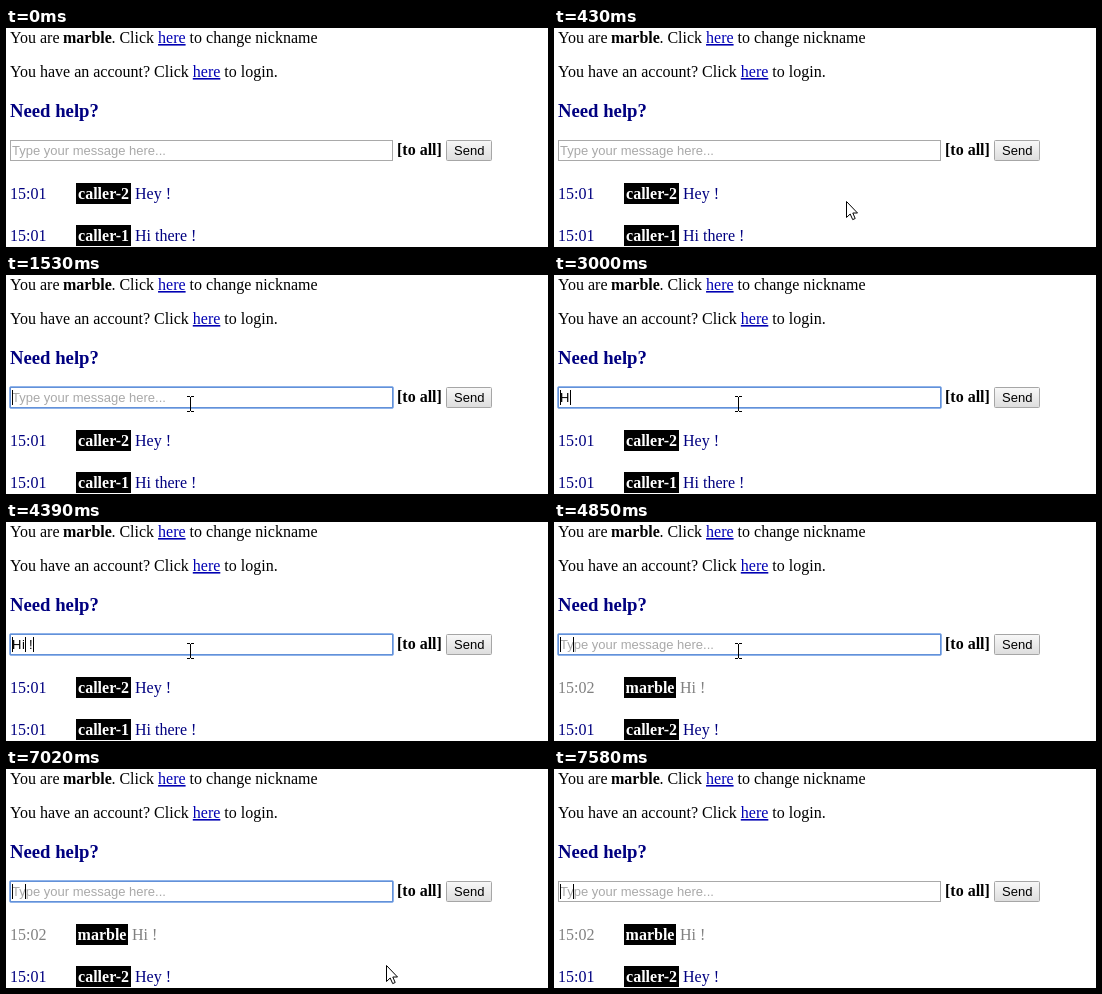
These frames come from a looping animation (542 px wide and 219 px high, 7650 ms). An HTML page:

```html
<!DOCTYPE html>
<html lang="en">
<head>
<meta charset="utf-8">
<title>Chat box</title>
<style>
html, body { margin: 0; width: 100%; height: 100%; overflow: hidden; background: #fff; }
svg { display: block; }
text { font: 16px "Liberation Serif", "Times New Roman", serif; }
.bold { font-weight: bold; }
.title { font-size: 18.72px; font-weight: bold; fill: #000080; }
.link { fill: #0000b3; text-decoration: underline; }
.ui { font: 13px "Liberation Sans", Arial, sans-serif; }
.hint { fill: #a9a9a9; }
.navy { fill: #000080; }
.gray { fill: #808080; }
.tag { font-weight: bold; fill: #fff; text-anchor: middle; }
.crisp { shape-rendering: crispEdges; }

/* every change is a hard cut on one 7650 ms clock */
.anim { opacity: 0; animation: 7650ms step-end infinite; }
.focus { animation-name: focus; }
.hint { animation-name: hint; }
.key-h { animation-name: typed-h; }
.key-i { animation-name: typed-i; }
.key-mark { animation-name: typed-mark; }
.caret-start { animation-name: caret-start; }
.caret-h { animation-name: caret-h; }
.caret-i { animation-name: caret-i; }
.before { animation-name: before; }
.after { animation-name: after; }
.beam { animation-name: beam; }
.arrow { animation-name: arrow; }

@keyframes focus { 0%, 97.77%, 100% { opacity: 0 } 12.81% { opacity: 1 } }
@keyframes hint { 0%, 63.39%, 100% { opacity: 1 } 39.21% { opacity: 0 } }
@keyframes typed-h { 0%, 63.39%, 100% { opacity: 0 } 39.21% { opacity: 1 } }
@keyframes typed-i { 0%, 63.39%, 100% { opacity: 0 } 42.22% { opacity: 1 } }
@keyframes typed-mark { 0%, 63.39%, 100% { opacity: 0 } 57.38% { opacity: 1 } }
@keyframes caret-start { 0% { opacity: 0 } 12.81%, 100% { opacity: 1 } }
@keyframes caret-h { 0%, 42.22%, 100% { opacity: 0 } 39.21% { opacity: 1 } }
@keyframes caret-i { 0% { opacity: 0 } 42.22%, 100% { opacity: 1 } }
@keyframes before { 0% { opacity: 1 } 63.39%, 100% { opacity: 0 } }
@keyframes after { 0% { opacity: 0 } 63.39%, 100% { opacity: 1 } }
@keyframes beam { 0%, 86.79%, 100% { opacity: 0 } 8.62% { opacity: 1 } }
@keyframes arrow {
  0% { opacity: 0; transform: translate(363px, 195px) }
  4.7% { opacity: 1; transform: translate(363px, 195px) }
  5.62% { opacity: 1; transform: translate(292px, 173px) }
  6.66% { opacity: 1; transform: translate(234px, 153px) }
  7.58% { opacity: 1; transform: translate(200px, 138px) }
  8.62% { opacity: 0; transform: translate(238px, 160px) }
  86.79% { opacity: 1; transform: translate(238px, 160px) }
  87.71% { opacity: 1; transform: translate(262px, 166px) }
  88.75% { opacity: 1; transform: translate(297px, 175px) }
  89.8% { opacity: 1; transform: translate(338px, 185px) }
  90.84% { opacity: 1; transform: translate(380px, 196px) }
  91.89% { opacity: 1; transform: translate(417px, 208px) }
  92.81%, 100% { opacity: 0; transform: translate(417px, 208px) }
}
</style>
</head>
<body>
<svg width="542" height="219" viewBox="0 0 542 219">
  <defs>
    <linearGradient id="face" x2="0" y2="1">
      <stop offset="0" stop-color="#f8f8f8"/>
      <stop offset="1" stop-color="#dddddd"/>
    </linearGradient>
  </defs>

  <text x="4" y="15">You are</text>
  <text class="bold" x="57" y="15">marble</text>
  <text x="105.4" y="15">. Click <tspan class="link">here</tspan> to change nickname</text>
  <text x="4" y="49">You have an account? Click <tspan class="link">here</tspan> to login.</text>
  <text class="title" x="4" y="89">Need help?</text>

  <!-- message field -->
  <rect class="crisp" x="4.5" y="112.5" width="382" height="20" fill="#fff" stroke="#a9a9a9"/>
  <g class="anim focus" fill="none">
    <rect x="3.5" y="111.5" width="384" height="22" rx="1.5" stroke="#8fb3ea"/>
    <rect x="4.5" y="112.5" width="382" height="20" stroke="#6391d8"/>
  </g>
  <text class="ui hint anim" x="6" y="127">Type your message here...</text>
  <text class="ui anim key-h" x="6" y="127">H</text>
  <text class="ui anim key-i" x="16" y="127">i</text>
  <text class="ui anim key-mark" x="23" y="127">!</text>
  <g class="crisp">
    <rect class="anim caret-start" x="6" y="115" width="1" height="15"/>
    <rect class="anim caret-h" x="16" y="115" width="1" height="15"/>
    <rect class="anim caret-i" x="19" y="115" width="1" height="15"/>
    <rect class="anim key-mark" x="27" y="115" width="1" height="15"/>
  </g>
  <text class="bold" x="391" y="127">[to all]</text>
  <rect x="440.5" y="112.5" width="45" height="20" rx="1" fill="url(#face)" stroke="#a6a6a6"/>
  <text class="ui" x="448" y="127">Send</text>

  <!-- message list -->
  <g class="anim before">
    <g class="navy">
      <text x="4" y="171">15:01</text>
      <text x="129" y="171">Hey !</text>
      <text x="4" y="213">15:01</text>
      <text x="129" y="213">Hi there !</text>
    </g>
    <rect class="crisp" x="70" y="155" width="55" height="21"/>
    <text class="tag" x="97.5" y="171">caller-2</text>
    <rect class="crisp" x="70" y="197" width="55" height="21"/>
    <text class="tag" x="97.5" y="213">caller-1</text>
  </g>
  <g class="anim after">
    <g class="gray">
      <text x="4" y="171">15:02</text>
      <text x="126" y="171">Hi !</text>
    </g>
    <g class="navy">
      <text x="4" y="213">15:01</text>
      <text x="129" y="213">Hey !</text>
    </g>
    <rect class="crisp" x="70" y="155" width="52" height="21"/>
    <text class="tag" x="96" y="171">marble</text>
    <rect class="crisp" x="70" y="197" width="55" height="21"/>
    <text class="tag" x="97.5" y="213">caller-2</text>
  </g>

  <!-- pointers -->
  <path class="anim beam crisp" d="M181 121.5h3m1 0h3M184.5 122v14M181 136.5h3m1 0h3" fill="none" stroke="#000"/>
  <path class="anim arrow" d="M.5 .5V16.5L4.2 13L6.7 18.6L9.2 17.5L6.8 12H11.5Z" fill="#fff" stroke="#000"/>
</svg>
</body>
</html>
```
